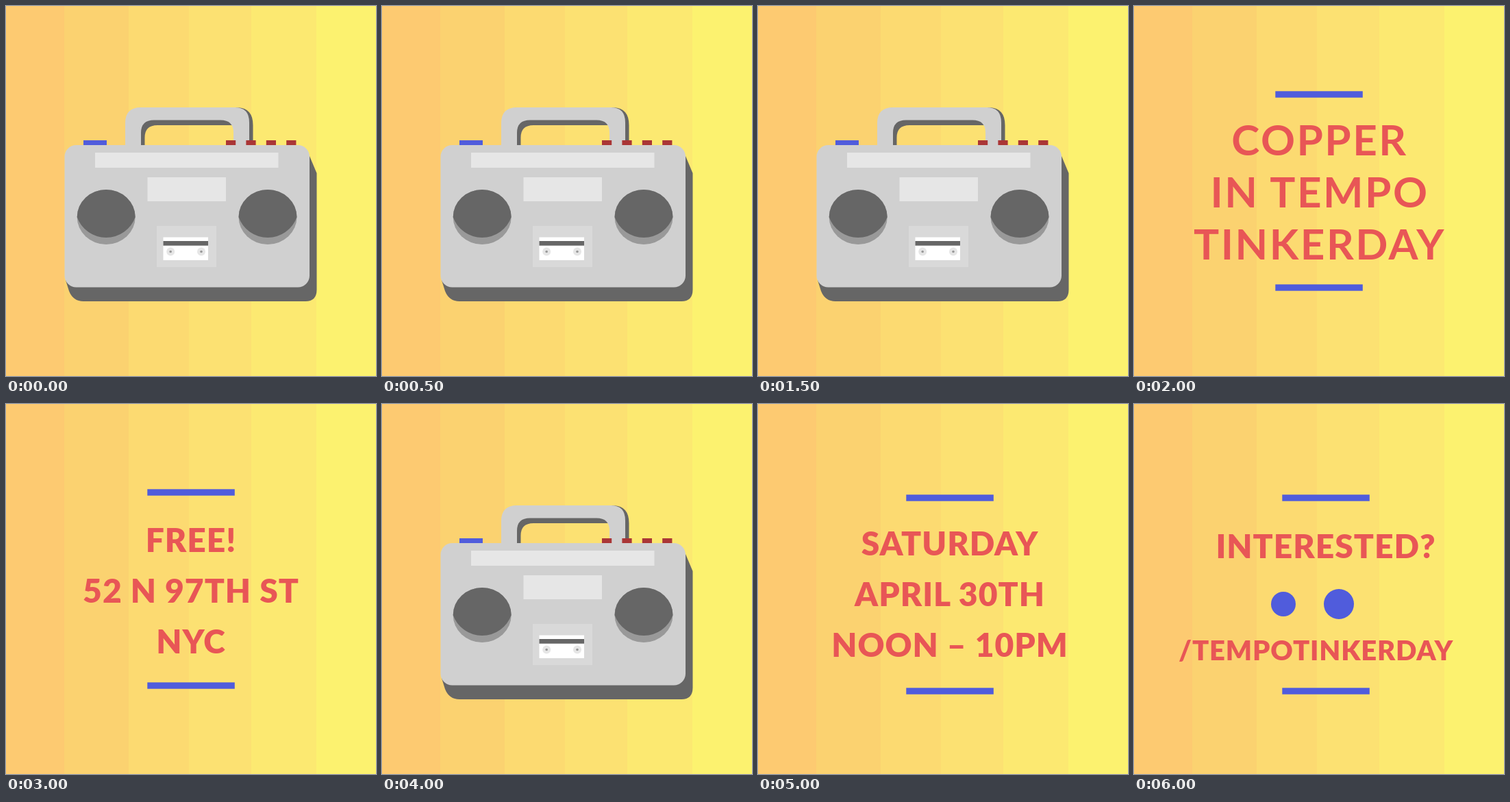
An HTML page for the animation above (7 s loop, 540 by 540 pixels).

```html
<!DOCTYPE html>
<html lang="en">
<head>
<meta charset="utf-8">
<title>Boombox invitation</title>
<style>
html, body { margin: 0; width: 100%; height: 100%; overflow: hidden; }
svg { display: block; width: 100vw; height: 100vh; }
text { font-family: Lato, sans-serif; font-weight: 900; letter-spacing: .02em; fill: #e85656; text-anchor: middle; }
#title text { font-weight: 700; letter-spacing: .04em; }
</style>
</head>
<body>
<svg id="stage" viewBox="0 0 540 540"></svg>
<script>
const BLUE = '#505cdc', RED = '#aa3636', DARK = '#666', LIGHT = '#d0d0d0', PALE = '#e6e6e6';
const LOOP = 7000;

const rect = (x, y, w, h, fill, rx = 0) =>
  `<rect x="${x}" y="${y}" width="${w}" height="${h}" rx="${rx}" fill="${fill}"/>`;
const circle = (x, y, r, fill) => `<circle cx="${x}" cy="${y}" r="${r}" fill="${fill}"/>`;
const path = (d, fill) => `<path d="${d}" fill="${fill}" fill-rule="evenodd"/>`;
const label = (str, x, y, size) => `<text x="${x}" y="${y}" font-size="${size}">${str}</text>`;
const lines = (list, x, y, step, size) =>
  list.map((str, i) => label(str, x, y + i * step, size)).join('');
const bars = (x, y) => [y, y + 282].map(top => rect(x, top, 127.5, 9.4, BLUE)).join('');

// Stepped gradient, left to right
function background() {
  const bands = [[0, '#fdca71'], [85, '#fbd270'], [179, '#fcda71'],
    [267, '#fce172'], [358, '#fce971'], [453, '#fcf26f']];
  return bands.map(([x, fill]) => rect(x, 0, 540 - x, 540, fill)).join('');
}

function speaker(x) {
  const y = 308, l = x - 42.5, r = x + 42.5;
  return `<ellipse cx="${x}" cy="${y}" rx="42.5" ry="40" fill="#999"/>` +
    path(`M${l} ${y}A42.5 40 0 0 1 ${r} ${y}A45.1 45.1 0 0 1 ${l} ${y}Z`, DARK);
}

function boombox() {
  const handleShade = 'M180 204V170Q180 148 202 148H338Q360.5 149 360.5 174V204Z' +
    'M202.5 204V192Q202.5 174 221 174H338V204Z';
  const handle = 'M174 204V171Q174 148 197 148H334Q355 148 355 170V204Z' +
    'M197 204V185Q197 166.5 216 166.5H313Q332 166.5 332 185V204Z';
  const bodyShade = 'M87 400L92 416Q98 431 113 431H437Q453.5 431 453.5 414V244L443 219L300 300Z';
  const reel = x => circle(x, 358.5, 6, PALE) + circle(x, 358.5, 1.8, '#999');
  return path(handleShade, DARK) + path(handle, LIGHT) +
    rect(113, 196, 34, 8, BLUE) +
    [321, 350.4, 379.8, 409.2].map(x => rect(x, 196, 14.2, 8, RED)).join('') +
    path(bodyShade, DARK) +
    rect(85.5, 203, 357.5, 207.5, LIGHT, 17) +
    rect(130, 214, 267.5, 22, PALE) + rect(206.5, 250, 114.5, 35, PALE) +
    speaker(146.2) + speaker(382) +
    rect(220, 321, 87, 60, '#d9d9d9') + rect(229.5, 337.5, 65.5, 33.5, '#fff') +
    rect(229.5, 343, 65.5, 6.7, DARK) + reel(240.2) + reel(285);
}

const scenes = {
  boombox: boombox(),
  title: bars(206.3, 124.3) + lines(['COPPER', 'IN TEMPO', 'TINKERDAY'], 271, 217.5, 76, 62),
  place: bars(206.3, 124.3) + lines(['FREE!', '52 N 97TH ST', 'NYC'], 270, 216, 74, 48),
  date: bars(216.3, 132.3) + lines(['SATURDAY', 'APRIL 30TH', 'NOON – 10PM'], 280, 221, 74, 48),
  links: bars(216.3, 132.3) + label('INTERESTED?', 280, 224.5, 48) +
    circle(218, 292, 18, BLUE) + circle(299, 292, 22, BLUE) +
    label('/TEMPOTINKERDAY', 265.5, 373.5, 40)
};
const cues = [[0, 'boombox'], [2000, 'title'], [3000, 'place'],
  [4000, 'boombox'], [5000, 'date'], [6000, 'links']];

const stage = document.getElementById('stage');
stage.innerHTML = background() + Object.entries(scenes)
  .map(([id, art]) => `<g id="${id}" visibility="hidden">${art}</g>`).join('');
const groups = [...stage.querySelectorAll('g')];

function draw(ms) {
  const t = ms % LOOP;
  const current = cues.filter(([start]) => t >= start).pop()[1];
  for (const g of groups) g.setAttribute('visibility', g.id === current ? 'visible' : 'hidden');
}

const begin = performance.now();
function tick() {
  draw(performance.now() - begin);
  requestAnimationFrame(tick);
}
tick();
</script>
</body>
</html>
```
